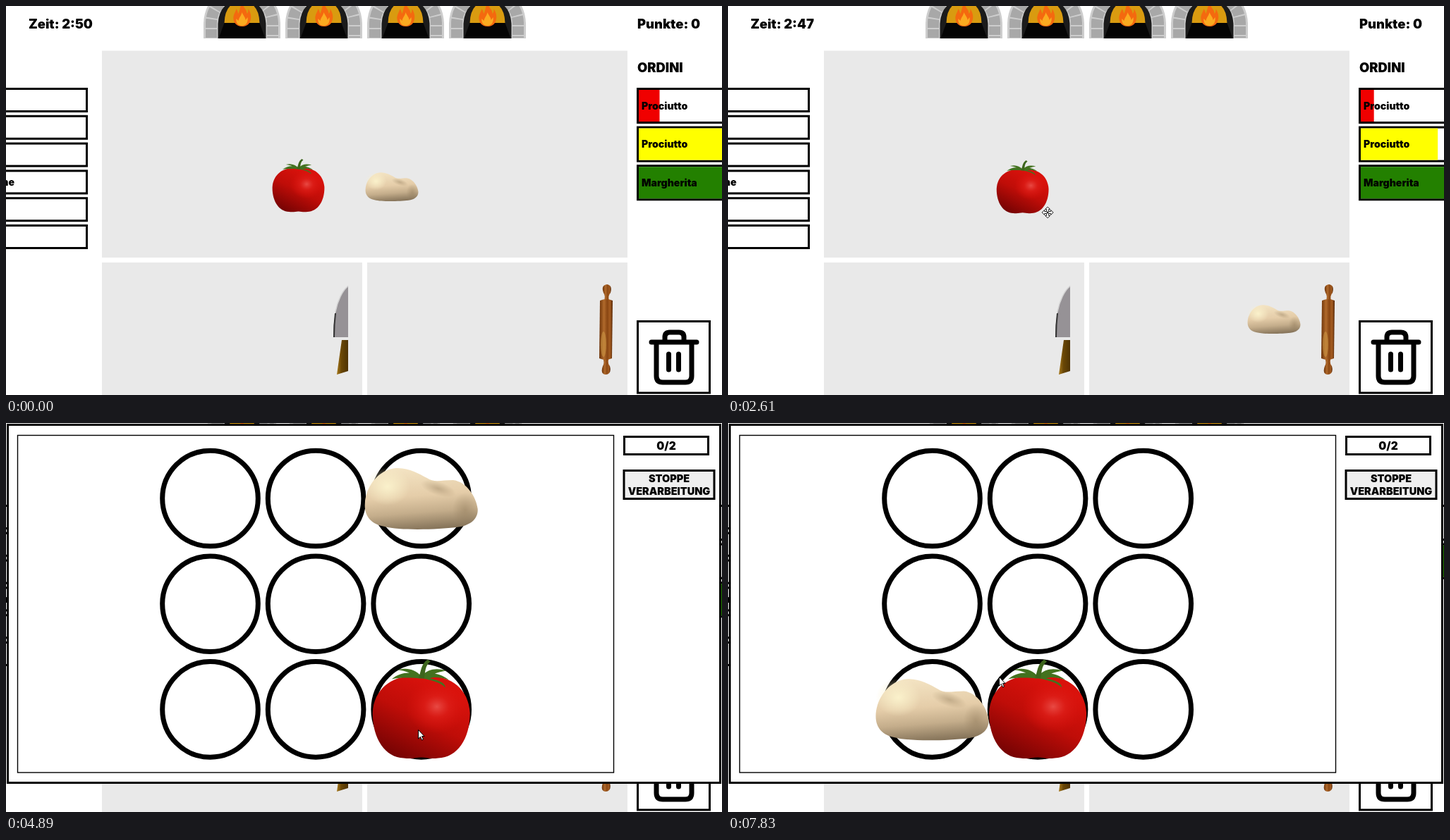
Animation, 1015 px wide and 552 px high, one loop 7860 ms. Source, as an HTML page:

```html
<!DOCTYPE html>
<html lang="de">
<head>
<meta charset="utf-8">
<title>Pizzeria</title>
<style>
  html, body { margin: 0; width: 100%; height: 100%; overflow: hidden; background: #fff; }
  svg { display: block; width: 1015px; height: 552px; }
  text { font: 900 14.1px Inter, sans-serif; }
  .big { font-size: 18.4px; }
  .button { font-size: 14.5px; }
  .box { fill: #fff; stroke: #000; stroke-width: 3; }
  .line { fill: none; stroke: #000; stroke-width: 7; stroke-linecap: round; stroke-linejoin: round; }
</style>
</head>
<body>
<svg viewBox="0 0 1015 552">
  <defs>
    <linearGradient id="red" x1=".75" y1=".15" x2=".25" y2="1">
      <stop offset="0" stop-color="#d9120c"/><stop offset=".45" stop-color="#bf0d08"/><stop offset="1" stop-color="#740303"/>
    </linearGradient>
    <radialGradient id="glow">
      <stop offset="0" stop-color="#e84a44"/><stop offset=".4" stop-color="#e0201a" stop-opacity=".7"/>
      <stop offset="1" stop-color="#dc120c" stop-opacity="0"/>
    </radialGradient>
    <linearGradient id="cream" x1=".4" y1="0" x2=".55" y2="1">
      <stop offset="0" stop-color="#f3e3c2"/><stop offset=".45" stop-color="#e5cda9"/>
      <stop offset=".72" stop-color="#c4ad8b"/><stop offset="1" stop-color="#857359"/>
    </linearGradient>
    <radialGradient id="shine">
      <stop offset="0" stop-color="#faf1cb"/><stop offset="1" stop-color="#faf1cb" stop-opacity="0"/>
    </radialGradient>
    <radialGradient id="shade">
      <stop offset="0" stop-color="#8a7454" stop-opacity=".4"/><stop offset="1" stop-color="#8a7454" stop-opacity="0"/>
    </radialGradient>
    <linearGradient id="wood">
      <stop offset="0" stop-color="#6d3308"/><stop offset=".35" stop-color="#b06a2c"/>
      <stop offset=".6" stop-color="#8a4713"/><stop offset=".8" stop-color="#a55d22"/><stop offset="1" stop-color="#572705"/>
    </linearGradient>
    <linearGradient id="handle">
      <stop offset="0" stop-color="#a87a1c"/><stop offset=".4" stop-color="#6a4706"/><stop offset="1" stop-color="#4e3303"/>
    </linearGradient>

    <g id="oven">
      <path d="M-54.5 46V25Q-53-22 0-22T54.5 25V46Z" fill="#cdcdcd"/>
      <path d="M-43.5 45V24Q-42-12 0-12T43.5 24V45" fill="none" stroke="#a8a8a8" stroke-width="16" stroke-dasharray="12 2"/>
      <path d="M-34 46V25Q-32-8 0-8T34 25V46Z" fill="#1b1b1b"/>
      <path d="M-25 24Q-24-6 0-6T25 24Z" fill="#d99b10"/>
      <path d="M-33 46L-25 24H25L33 46Z" fill="#050505"/>
      <path d="M0 29C-9 29-13 22-12 15C-11 10-9 8-8 4C-6 7-6 9-5 11C-3 6-3 1 1-5C1 3 7 4 7 11C9 9 9 7 9 4C13 10 14 17 11 23C9 27 5 29 0 29Z" fill="#f4690f"/>
      <path d="M0 28C-6 28-9 23-8 18L-5 21C-4 16-1 14 0 9C2 14 5 16 5 20L8 16C9 23 6 28 0 28Z" fill="#fbab20"/>
    </g>

    <g id="tomato">
      <path d="M0-46C34-52 67-34 69 5C69 42 51 68 24 69C13 71 8 68 0 68S-13 71-25 69C-51 68-69 42-69 5C-67-34-34-52 0-46Z" fill="url(#red)"/>
      <ellipse cx="22" cy="-4" rx="44" ry="38" fill="url(#glow)"/>
      <path d="M-42-43C-30-53-12-55-2-47C10-54 26-52 39-42C26-46 18-46 12-44C24-42 34-38 34-31C28-38 14-42 2-44C-12-45-30-46-42-43ZM-33-56C-20-60-8-56 0-47C10-58 22-59 35-55C22-53 12-48 4-44H-4C-12-51-22-55-33-56Z" fill="#43721f"/>
      <path d="M-4-45C0-54-1-64 9-71L13-68C5-62 6-54 4-44Z" fill="#3d651c"/>
    </g>

    <g id="dough">
      <path d="M-80 10C-80-12-66-34-46-41C-25-48-5-36 8-29C18-22 28-26 45-26C64-24 78-2 80 15C81 30 68 39 50 41C25 44-30 46-52 40C-70 37-80 26-80 10Z" fill="url(#cream)"/>
      <ellipse cx="-48" cy="-17" rx="32" ry="27" fill="url(#shine)"/>
      <ellipse cx="24" cy="-14" rx="26" ry="10" fill="url(#shade)" transform="rotate(18 24 -14)"/>
      <ellipse cx="62" cy="16" rx="18" ry="24" fill="url(#shade)"/>
    </g>

    <g id="pin" fill="url(#wood)">
      <path d="M848 418Q850 411 847 407Q843 396 852 395Q860 396 857 407Q853 411 855 418Z"/>
      <path d="M846 499Q849 506 846 511Q842 522 850 523Q859 522 856 511Q852 506 855 499Z"/>
      <path d="M842 418Q851 414 860 418L859 500Q850 504 841 500Z"/>
      <ellipse cx="847" cy="480" rx="4" ry="18" fill="#d3a04a" opacity=".5"/>
    </g>

    <path id="arrow" d="M.5.5V13L3.4 10.3L5.5 15L7.5 14L5.5 9.5H9Z" fill="#fff" stroke="#000"/>
    <g id="move" fill="#fff" stroke="#222">
      <path id="tip" d="M-1.5-2V-4.5H-3.5L0-8L3.5-4.5H1.5V-2L0 0Z"/>
      <use href="#tip" transform="rotate(90)"/><use href="#tip" transform="rotate(180)"/><use href="#tip" transform="rotate(270)"/>
    </g>
    <g id="roll" transform="rotate(45)">
      <path d="M-7 0H7" stroke="#5e2a08" stroke-width="2"/>
      <rect x="-4.5" y="-2.5" width="9" height="5" fill="#c98332" stroke="#6d3308"/>
    </g>
  </defs>

  <g id="ovens"></g>
  <path d="M136 63.5H881V357H136ZM136 364H505V552H136ZM512 364H881V552H512Z" fill="#e9e9e9"/>
  <g id="menu"></g>
  <text x="12" y="255" text-anchor="end">ne</text>
  <text class="big" x="32" y="32" id="clock"></text>
  <text class="big" x="895" y="32">Punkte: 0</text>
  <text class="big" x="895" y="94">ORDINI</text>
  <g id="orders"></g>

  <path d="M485 397C471 408 464 438 464 470H485Z" fill="#969296"/>
  <path d="M485 397.5C477 404 470 418 467 434" fill="none" stroke="#d4d4d4" stroke-width="1.5"/>
  <path d="M467 436Q465 452 465 470" fill="none" stroke="#333" stroke-width="2"/>
  <path d="M476 474H485V518L469 523Z" fill="url(#handle)"/>
  <use href="#pin"/>

  <rect class="box" x="895.5" y="447.5" width="102" height="101.5"/>
  <path class="line" d="M915 477H979M934 475V470Q934 463 941 463H954Q961 463 961 470V475M922 480V525Q922 534 931 534H963Q972 534 972 525V480M939.5 494V516M953.5 494V516"/>

  <g id="modal">
    <rect class="box" x="2.5" y="2.5" width="1010" height="508"/>
    <rect x="16.5" y="17.5" width="845" height="478.5" fill="none" stroke="#000" stroke-width="1.4"/>
    <g id="holes" fill="none" stroke="#000" stroke-width="7"></g>
    <rect class="box" x="876.5" y="19.5" width="119" height="25"/>
    <rect class="box" x="876" y="67.5" width="128" height="40" style="fill:#efefef"/>
    <g text-anchor="middle">
      <text x="936" y="38" style="font-size:15.5px">0/2</text>
      <text class="button" x="940" y="84">STOPPE</text>
      <text class="button" x="940" y="102">VERARBEITUNG</text>
    </g>
  </g>
  <use href="#dough" id="doughItem"/>
  <use href="#tomato" id="tomatoItem"/>
  <use id="cursor"/>
</svg>
<script>
const $ = id => document.getElementById(id);
const repeat = (n, draw) => Array.from({ length: n }, (_, i) => draw(i)).join('');
const LOOP = 7860, OPEN = 4290, FIRST_HOP = 4670, HOP = 500, EXPIRE = 6930;
const doughCells = [2, 0, 7, 0, 4, 2, 6], tomatoCells = [8, 4, 6, 8, 5, 0, 7];

// Mouse moves, with rests between them
const start = { x: 1018, y: 30 };
const moves = [
  { from: 90, to: 870, x: 528, y: 254 },
  { from: 960, to: 1680, x: 755, y: 442 },
  { from: 1770, to: 2520, x: 450, y: 291 },
  { from: 2580, to: 2970, x: 625, y: 402 },
  { from: 2970, to: 3360, x: 675, y: 469 },
  { from: 3390, to: 3780, x: 838, y: 441 },
  { from: 4290, to: 4890, x: 584, y: 435 },
  { from: 5040, to: 5370, x: 567, y: 270 },
  { from: 5580, to: 5820, x: 458, y: 243 },
  { from: 6180, to: 6600, x: 597, y: 470 },
  { from: 6600, to: 7170, x: 520, y: 170 },
  { from: 7350, to: 7830, x: 384, y: 360 }
];

function mouse(t) {
  let { x, y } = start;
  for (const m of moves) {
    const u = Math.min(1, Math.max(0, (t - m.from) / (m.to - m.from)));
    const eased = u * u * (3 - 2 * u);
    x += (m.x - x) * eased;
    y += (m.y - y) * eased;
  }
  return [x, y];
}

const cell = i => [289.5 + i % 3 * 149.6, 107 + Math.floor(i / 3) * 149.7];
$('ovens').innerHTML = repeat(4, i => `<use href="#oven" x="${334.5 + 116 * i}"/>`);
$('menu').innerHTML = repeat(6, i => `<rect class="box" x="-20" y="${117.5 + 38.8 * i}" width="134.5" height="32"/>`);
$('holes').innerHTML = repeat(9, i => `<circle cx="${cell(i)[0]}" cy="${cell(i)[1]}" r="67.8"/>`);
$('orders').innerHTML = [['Prociutto', '#f00000'], ['Prociutto', '#ffff00'], ['Margherita', '#238000']].map(([name, color]) =>
  `<g><rect class="box" x="895.5" y="117.5" width="160" height="48"/>
   <rect class="bar" x="897" y="119" height="45" fill="${color}"/><text x="901" y="146.5">${name}</text></g>`).join('');
const orders = [...$('orders').children];
const barWidths = [29.5, 120, 160];

function show(el, visible) {
  el.style.display = visible ? '' : 'none';
}

function place(el, [x, y], scale = 1) {
  el.setAttribute('transform', `translate(${x} ${y}) scale(${scale})`);
}

// Position of an item before, during and after its drag
function dragged(t, begin, end, from, to) {
  if (t < begin) return from;
  if (t >= end) return to;
  const grip = mouse(begin);
  return mouse(t).map((v, k) => v + from[k] - grip[k]);
}

function cursorKind(t) {
  if (t >= 800 && t < 1830 || t >= 2470 && t < 3390) return '#move';
  return t >= 5790 && t < 6200 ? '#roll' : '#arrow';
}

function render(t) {
  const open = t >= OPEN, hop = Math.floor((t - FIRST_HOP) / HOP), expired = t >= EXPIRE;
  $('clock').textContent = 'Zeit: 2:' + (50 - Math.floor((t + 400) / 800));

  orders.forEach((order, i) => {
    order.querySelector('.bar').setAttribute('width', Math.max(0, barWidths[i] - 0.00415 * t));
    show(order, i || !expired);
    place(order, [0, 54.6 * (i - expired)]);
  });

  show($('modal'), open);
  show($('doughItem'), !open || hop >= 0);
  show($('tomatoItem'), !open || hop >= 0);
  if (!open) {
    place($('doughItem'), dragged(t, 960, 1680, [547, 256.5], [774, 444.5]), 0.468);
    place($('tomatoItem'), dragged(t, 2580, 3360, [414.5, 255], [645, 440.5]), 0.535);
  } else if (hop >= 0) {
    place($('doughItem'), cell(doughCells[hop]));
    place($('tomatoItem'), cell(tomatoCells[hop]));
  }

  show($('cursor'), t >= 90);
  $('cursor').setAttribute('href', cursorKind(t));
  place($('cursor'), mouse(t));
}

function tick() {
  render(performance.now() % LOOP);
  requestAnimationFrame(tick);
}
tick();
</script>
</body>
</html>
```
